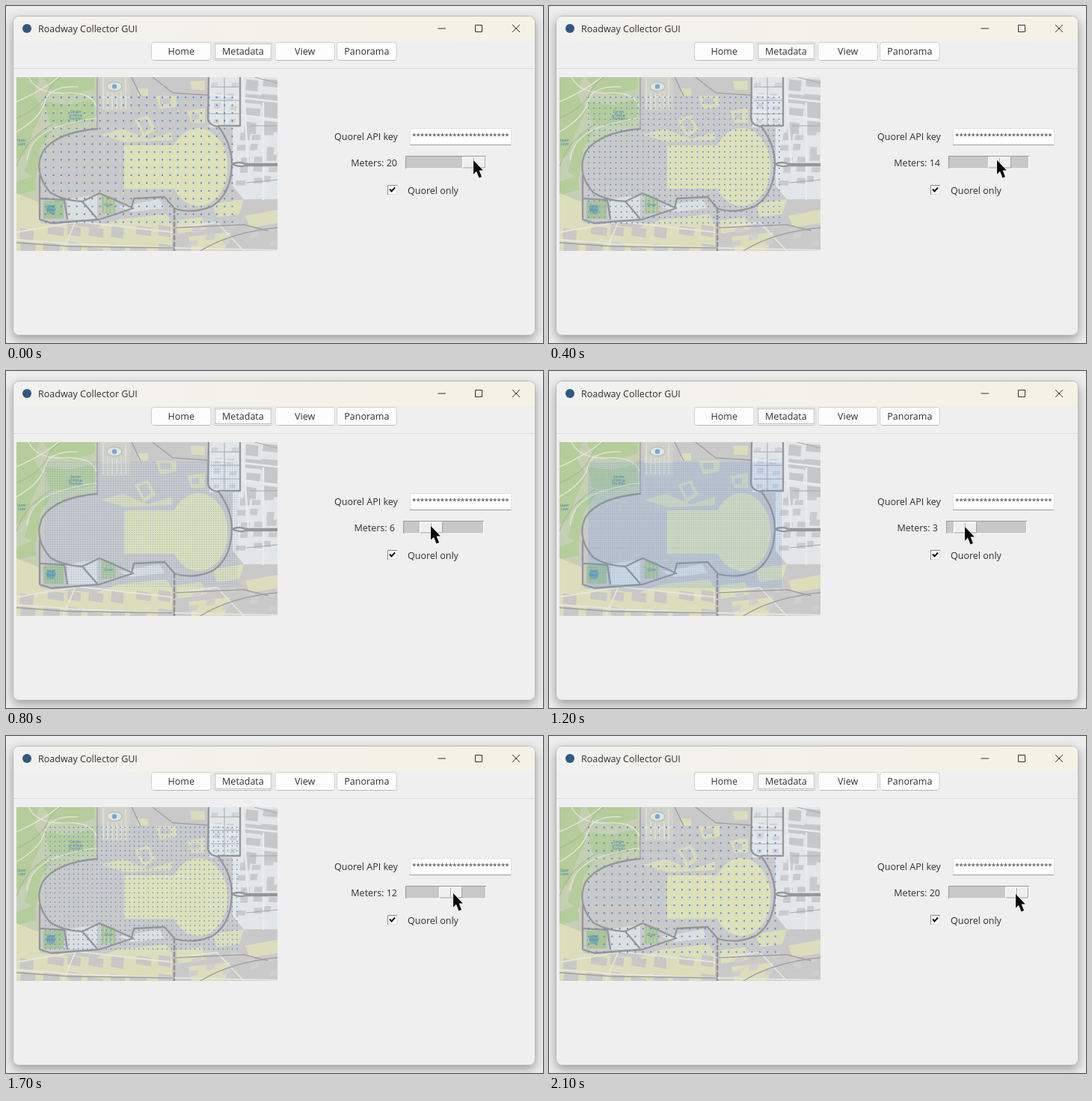
An HTML page that plays this animation: 718x450 px, repeating every 2.2 s.

```html
<!DOCTYPE html>
<html lang="en">
<head>
<meta charset="utf-8">
<title>Metadata panel</title>
<style>
  html, body { margin: 0; width: 100%; height: 100%; overflow: hidden; background: #ededed; }
  svg { display: block; width: 718px; height: 450px; }
  text { font: 12.5px "Open Sans", "Noto Sans", sans-serif; fill: #303030; }
  .mid { text-anchor: middle; }
  .end { text-anchor: end; }
  .tiny text { font-size: 4.5px; font-style: italic; fill: #477fb4; text-anchor: middle; }
  .line { fill: none; stroke-linecap: round; stroke-linejoin: round; }
</style>
</head>
<body>
<svg viewBox="0 0 718 450">
  <defs>
    <filter id="shadow" x="-10%" y="-10%" width="120%" height="125%">
      <feDropShadow dx="0" dy="5" stdDeviation="7" flood-color="#000" flood-opacity=".34"/>
    </filter>
    <linearGradient id="bar">
      <stop offset="0" stop-color="#f1f1ef"/>
      <stop offset=".5" stop-color="#f4f2e8"/>
      <stop offset="1" stop-color="#f4f1e6"/>
    </linearGradient>
    <clipPath id="mapClip"><rect x="14" y="95" width="349" height="232"/></clipPath>
  </defs>

  <rect width="718" height="450" fill="#ededed"/>
  <rect x="9.5" y="13.5" width="698" height="426" rx="8" fill="#efefef" stroke="#b9b9b9" filter="url(#shadow)"/>
  <path d="M10 47V22a8 8 0 0 1 8-8H699a8 8 0 0 1 8 8V47Z" fill="url(#bar)"/>
  <circle cx="28" cy="30" r="6" fill="#31587f"/>
  <text x="43" y="34.5">Roadway Collector GUI</text>
  <path d="M577.5 30H588M627.5 25.5H636.5V34.5H627.5ZM677 25L687 35M687 25L677 35" fill="none" stroke="#333"/>
  <path d="M10 83.5H707" stroke="#dcdcdc"/>
  <g id="tabs"></g>
  <rect x="279.5" y="50.5" width="75" height="20" fill="none" stroke="#777" stroke-dasharray="1 1"/>

  <g clip-path="url(#mapClip)">
    <rect x="14" y="95" width="349" height="232" fill="#c9c9c9"/>

    <!-- gardens -->
    <path d="M14 95H121V163Q64 172 44 204L40 240L46 290H14Z" fill="#c6cfb3"/>
    <path d="M14 95H44L38 120L50 138L36 168L26 198L14 205ZM50 95H118V110L88 119L60 112ZM52 128L84 132L118 124V152L82 160L58 156ZM40 172L62 165L46 190L40 230L25 222ZM14 235L38 226L40 246L14 252Z" fill="#b5cc9b"/>
    <path class="line" d="M14 128Q50 112 70 95M30 95Q42 118 78 116T121 134M14 168Q46 150 52 128T96 108M28 206Q32 170 80 158T121 152" stroke="#e6e9da" stroke-width="1.2"/>
    <path class="line" d="M14 150Q46 136 54 118T74 95M14 214Q26 178 62 158" stroke="#a3b28f"/>

    <!-- lawns and courts -->
    <path d="M158 186H225A39 52 0 1 1 225 244H158Z" fill="#dee0b9"/>
    <path d="M172 152L190 146L200 165L184 176ZM200 120H228V134L206 138ZM242 140L266 136V156L248 156ZM176 110H190V120H176ZM246 100H266V112H248ZM126 172L156 164L190 178L222 168V179L160 182Z" fill="#dadcbb"/>
    <path d="M177 154L188 150L194 163L185 169ZM206 123H220V131H206ZM248 143H258V151H248Z" fill="#c9c9c9"/>
    <path d="M14 250L44 262L46 290L120 296L150 285L214 278L222 290V327H14ZM228 286L262 282L268 298L230 304ZM276 264L318 258L312 278L282 282ZM320 280L363 272V290L326 296ZM244 308L300 302L292 327H248Z" fill="#dcdebb"/>
    <path d="M82 258L122 252V285H82ZM150 268L205 258L212 270L168 275Z" fill="#dcdfdf"/>
    <path d="M50 260H77V284H50ZM128 252L146 256V277H128Z" fill="#a9c497"/>
    <path d="M132 255V276M137 255V277M142 256V277" stroke="#c8d6ae"/>
    <ellipse cx="60" cy="271" rx="7" ry="5" fill="#7fb0b6"/>

    <!-- parterre -->
    <path d="M125 95H166V140H130Z" fill="#cfd0c6"/>
    <path d="M130 96V138M136 114V138M142 116V138M148 116V138M154 114V138M160 97V138M127 122H166" stroke="#e8e8e2"/>
    <ellipse cx="145" cy="107.5" rx="10" ry="6" fill="#dfe5df" stroke="#a9b7b9"/>
    <circle cx="145" cy="107.5" r="3.2" fill="#79a7cf"/>

    <!-- town blocks -->
    <path d="M272 95H363V258H318L303 240V162H272Z" fill="#e3e6e8"/>
    <g id="blocks"></g>
    <path class="line" d="M316 95L324 212M274 118L363 128M274 140L363 152M344 130V258" stroke="#e9ebec" stroke-width="2.5"/>
    <path class="line" d="M332 95L363 103M274 108H312M274 126H312M274 144H312M292 96V160M326 160H363M322 236L363 232" stroke="#a5a8aa"/>

    <!-- roads -->
    <path class="line" d="M14 302L96 288L222 302M14 312L90 318L226 323L363 326M92 290L76 327M226 296L282 289L318 327" stroke="#e6e6de" stroke-width="1.8"/>
    <path class="line" d="M122 95V163M168 95L180 120M196 95L223 116L270 119M14 316L84 321L225 323M226 296L318 292L350 300M260 327Q300 302 363 296" stroke="#a0a0a0" stroke-width="1.4"/>
    <path class="line" d="M271 95L270 151Q272 160 284 161Q302 185 302 211Q301 251 276 267Q252 278 226 271L212 255L171 257L168 269L125 250L102 261Q77 260 59 249Q36 222 49 195Q66 169 122 164M302 211Q312 207 320 211H363M302 211Q311 216 320 213H363M45 226L45 285L61 290L125 285L170 270M102 261L121 283M45 257L78 259L82 284M284 160H313V95" stroke="#969696" stroke-width="2.3"/>
    <path class="line" d="M225 271V327" stroke="#929292" stroke-width="2.6" stroke-dasharray="5 4"/>

    <g class="tiny">
      <text x="93" y="143">Garden</text><text x="93" y="147.5">of Willow</text><text x="93" y="152">Fountain</text>
      <text x="21" y="181">Upper</text><text x="21" y="185.5">Lawn</text>
      <text x="60" y="269">Small</text><text x="60" y="273.5">Water</text><text x="60" y="278">Court</text>
      <text x="137" y="267">Grove</text>
    </g>
    <path id="dots" fill="none" stroke="#5292e6" stroke-linecap="round"/>
  </g>

  <text x="439" y="178.5">Quorel API key</text>
  <rect x="540" y="163" width="135" height="22" fill="#fff"/>
  <path d="M540 185.5H675" stroke="#9c9c9c"/>
  <path d="M540.5 185V163.5H675.5V185" fill="none" stroke="#e0e0e0"/>
  <text x="543" y="176.5" style="font-size:9.8px">************************</text>

  <text id="meters" class="end" y="213.5"></text>
  <g id="slider">
    <rect y="200" width="108" height="17" fill="#c8c8c8"/>
    <path d="M.5 217V200.5H108" fill="none" stroke="#9b9b9b"/>
    <path d="M1 217H107.5V201" fill="none" stroke="#fff"/>
    <g id="thumb">
      <rect y="201.5" width="31" height="15" fill="#efefef"/>
      <path d="M.5 216V202H30" fill="none" stroke="#fff"/>
      <path d="M1 216H30.5V202M15.5 203V215" fill="none" stroke="#a2a2a2"/>
      <path d="M16.5 203V215" stroke="#fff"/>
    </g>
  </g>

  <rect x="510" y="239" width="13" height="13" fill="#fff"/>
  <path d="M510.5 252V239.5H523" fill="none" stroke="#858585"/>
  <path d="M511 251.5H522.5V240" fill="none" stroke="#dcdcdc"/>
  <path d="M513 244.5L515.5 247.5L520 242.5" fill="none" stroke="#111" stroke-width="2"/>
  <text x="537" y="250.5">Quorel only</text>

  <path id="cursor" d="M0 0V18.5L4 14.7L7.5 23.5L11 22L7.6 13.5H12.8Z" fill="#080808" stroke="#fff" stroke-width=".7" paint-order="stroke"/>
</svg>
<script>
const $ = id => document.getElementById(id);
const STEP = 100, LOOP = 2200, PX_PER_METER = 0.52;
const AREA = { left: 53, top: 122, right: 311, bottom: 290 };

// step, meters, cursor x, cursor y
const KEYS = [
  [0, 20, 625, 206], [1, 19.5, 622, 206], [4, 14, 599, 206], [8, 6, 568, 207],
  [11, 3, 556, 208], [12, 3, 556, 208], [15, 10, 582, 208], [17, 12, 598, 210], [21, 20, 624, 211]
];

function sample(step) {
  const i = Math.max(1, KEYS.findIndex(k => k[0] >= step));
  const a = KEYS[i - 1], b = KEYS[i];
  const p = (step - a[0]) / (b[0] - a[0]);
  return a.map((v, n) => v + (b[n] - v) * p);
}

$("tabs").innerHTML = ["Home", "Metadata", "View", "Panorama"].map((name, i) => {
  const x = 194.5 + i * 82.7;
  return `<rect x="${x}" y="48.5" width="79.5" height="24" rx="3" fill="#fdfdfd" stroke="#cfcfcf"/>
    <path d="M${x + 3} 72.5h74" stroke="#b9b9b9"/>
    <text class="mid" x="${x + 39.7}" y="65">${name}</text>`;
}).join("");

let seed = 11;
const random = () => (seed = seed * 16807 % 2147483647) / 2147483647;

// A loose grid of slanted blocks; fullness is the share of each cell they cover.
function buildings(left, top, cols, rows, gap, fullness, fill, tilt) {
  let d = "";
  for (let r = 0; r < rows; r++) for (let c = 0; c < cols; c++) {
    const slack = gap * (1 - fullness);
    const x = left + c * gap + random() * slack, y = top + r * gap * 0.8 + random() * slack;
    const w = gap * fullness * (0.8 + random() * 0.4), h = gap * fullness * (0.5 + random() * 0.4);
    d += `M${x.toFixed(1)} ${y.toFixed(1)}l${w.toFixed(1)} ${tilt}l-1 ${h.toFixed(1)}l${(-w).toFixed(1)} ${-tilt}z`;
  }
  return `<path d="${d}" fill="${fill}"/>`;
}

$("blocks").innerHTML =
  buildings(275, 98, 2, 4, 19, 0.5, "#d0d4d7", 0) +
  buildings(318, 96, 2, 4, 23, 0.85, "#c6c7c8", 2) +
  buildings(307, 166, 3, 5, 19, 0.6, "#c9cacb", 0) +
  buildings(16, 288, 7, 2, 30, 0.65, "#c8c8c6", 3) +
  buildings(236, 282, 5, 3, 26, 0.4, "#cfcfcd", -2);

function dotRows(spacing) {
  let d = "";
  for (let y = AREA.top; y <= AREA.bottom; y += spacing) d += `M${AREA.left} ${y.toFixed(2)}H${AREA.right}`;
  return d;
}

let shown = -1;
function showMeters(meters) {
  if (meters === shown) return;
  shown = meters;
  const shift = meters < 10 ? 3 : 0, spacing = meters * PX_PER_METER;
  const dots = $("dots");
  dots.setAttribute("d", dotRows(spacing));
  dots.setAttribute("stroke-dasharray", `0 ${spacing}`);
  dots.setAttribute("stroke-width", 0.95 + meters * 0.07);
  dots.setAttribute("stroke-opacity", Math.min(1, 0.23 + meters * 0.055));
  $("meters").textContent = `Meters: ${meters}`;
  $("meters").setAttribute("x", 523 - shift);
  $("slider").setAttribute("transform", `translate(${534 - shift} 0)`);
  $("thumb").setAttribute("transform", `translate(${Math.round(meters * 3.88 - 1.6)} 0)`);
}

function draw(time) {
  const [, meters, x, y] = sample(Math.floor(time % LOOP / STEP));
  showMeters(Math.round(meters));
  $("cursor").setAttribute("transform", `translate(${Math.round(x)} ${Math.round(y)})`);
}

const start = performance.now();
function tick() {
  draw(performance.now() - start);
  requestAnimationFrame(tick);
}
tick();
</script>
</body>
</html>
```
